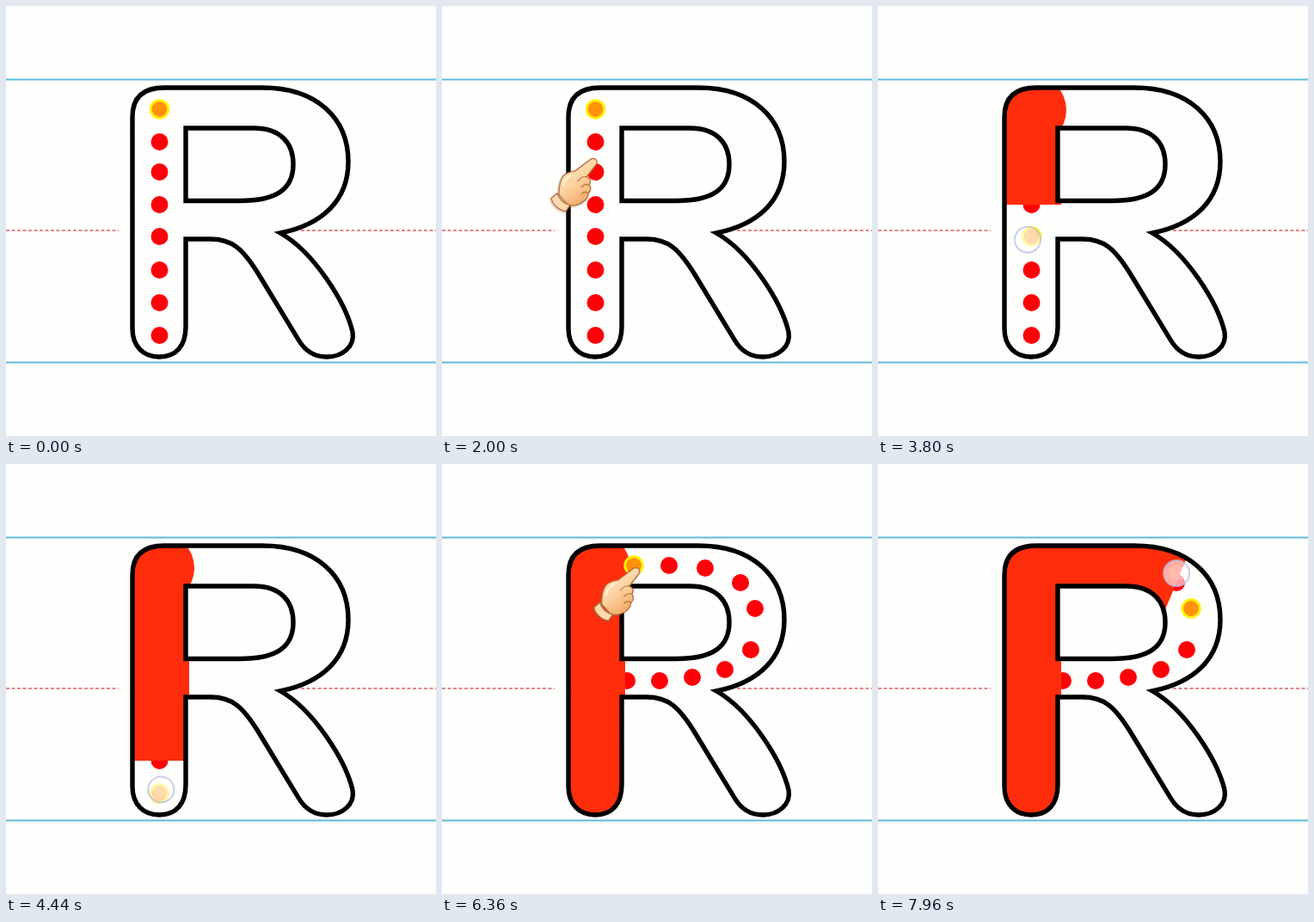
An HTML page that plays this animation: 500x500 px, repeating every 8 s.

```html
<!DOCTYPE html>
<html lang="en">
<head>
<meta charset="utf-8">
<title>Trace the letter</title>
<style>
  html, body { margin: 0; width: 100%; height: 100%; overflow: hidden; background: #fefefd; }
  svg { display: block; width: 100%; height: 100%; }
</style>
</head>
<body>
<svg viewBox="0 0 500 500">
  <defs>
    <path id="letter" d="M147 129C147 106 160 95 184 95H298C362 95 398 131 398 181C398 226 368 254 319 264C358 286 395 345 403 379C406 396 391 408 373 408C358 408 347 400 340 388L295 314C275 281 262 271 238 271H209V373C209 395 198 408 178 408C160 408 147 396 147 375Z
      M209 142H288C320 142 334 160 334 184C334 212 316 226.500 272 226.500H209Z"/>
    <clipPath id="inside"><use href="#letter" clip-rule="evenodd"/></clipPath>
    <linearGradient id="skin" x1="0" y1="0" x2=".6" y2="1">
      <stop offset="0" stop-color="#ffeacb"/>
      <stop offset=".55" stop-color="#fdd3a2"/>
      <stop offset="1" stop-color="#f2a664"/>
    </linearGradient>
    <path id="palm" d="M171 136C176 131 183 135 179 141L168 155C173 157 174 161 171 164C174 167 173 172 170 174C170 181 163 186 156 188C151 189 147 188 145 186L136 176C136 168 137 159 141 154C144 150 150 149 155 148Z"/>
    <path id="cuff" d="M134 174C136 181 141 186 149 188L144 195C136 194 129 188 127 180Z"/>
  </defs>
  <rect width="500" height="500" fill="#fefefd"/>
  <path d="M0 85.500H500M0 414.500H500" stroke="#5fbcd8" stroke-width="1.800"/>
  <path d="M0 261H131M343 261H500" stroke="#d4626a" stroke-width="1.500" stroke-dasharray="4 2.500"/>
  <g id="dots" fill="#ff0008"></g>
  <g clip-path="url(#inside)" fill="none" stroke="#ff2d0c" stroke-width="70" stroke-linejoin="round">
    <circle id="cap" cx="178" cy="121" r="41" fill="#ff2d0c" stroke="none"/>
    <path id="stem"/>
    <path id="bowl"/>
  </g>
  <use href="#letter" fill="none" stroke="#000" stroke-width="5.400" stroke-miterlimit="10"/>
  <circle id="next" r="10.300" fill="#ff9208" stroke="#fff200" stroke-width="2.800"/>
  <g id="hand" stroke-linejoin="round" stroke-linecap="round">
    <g fill="#8a5a3a" stroke="#8a5a3a" stroke-width="3" opacity=".22" transform="translate(-1 1)">
      <use href="#palm"/><use href="#cuff"/>
    </g>
    <g fill="url(#skin)" stroke="#b4703c" stroke-width="1.300">
      <use href="#palm"/><use href="#cuff" fill="#ffd9ae"/>
    </g>
    <g fill="none" stroke="#b4703c" stroke-width="1.200">
      <path d="M168 155C164 154 160 157 158 160M171 164C167 163 164 165 162 167M170 174C167 172 164 173 162 175"/>
      <path d="M141 165C142 160 146 155 150 153" stroke="#fff3df" stroke-width="2"/>
    </g>
  </g>
  <g id="touch">
    <circle r="15" fill="#fff" fill-opacity=".62" stroke="#b9bde0" stroke-opacity=".75" stroke-width="2"/>
    <circle r="9" fill="#fff" fill-opacity=".15"/>
  </g>
</svg>
<script>
const LOOP = 8000;
const SWITCH = 4480;
const $ = id => document.getElementById(id);
const clamp = v => Math.max(0, Math.min(1, v));
const ramp = (t, a, b) => clamp((t - a) / (b - a));

const stemDots = [120, 158, 193, 231, 268, 307, 345, 383].map(y => [178.5, y]);
const bowlDots = [[223, 118], [264, 118], [306, 121], [347, 138], [364, 168],
  [359, 216], [329, 239], [291, 248], [253, 252], [215, 252]];

// Touch keyframes: time, x, y
const stemTouch = [[2900, 178, 120], [3800, 174, 271.5], [4720, 183, 425]];
const bowlTouch = [[7040, 213, 106], [7390, 264, 108], [7680, 306, 113], [7960, 347, 127], [8000, 352, 131]];

// Hint hand: shown from, hidden at, start of the move, fingertip, direction
const hints = [
  { on: 160, off: 2890, go: 870, x: 178, y: 121, dx: 0, dy: 1 },
  { on: 4880, off: 7090, go: 6250, x: 222, y: 122, dx: 1, dy: 0 }
];
const HAND_SPEED = 0.051;

function along(keys, t) {
  let i = 1;
  while (i < keys.length - 1 && t > keys[i][0]) i++;
  const [a, b] = [keys[i - 1], keys[i]];
  const k = ramp(t, a[0], b[0]);
  return [a[1] + (b[1] - a[1]) * k, a[2] + (b[2] - a[2]) * k];
}

const line = pts => pts.length > 1 ? "M" + pts.map(p => p.join(" ")).join("L") : "";

function place(el, [x, y], opacity) {
  el.setAttribute("transform", `translate(${x} ${y})`);
  el.setAttribute("opacity", opacity);
}

function dotGroup(dots) {
  const g = document.createElementNS("http://www.w3.org/2000/svg", "g");
  g.innerHTML = dots.map(([x, y]) => `<circle cx="${x}" cy="${y}" r="10"/>`).join("");
  $("dots").append(g);
  return g;
}
const groups = [dotGroup(stemDots), dotGroup(bowlDots)];

function render(t) {
  const second = t >= SWITCH;
  const dots = second ? bowlDots : stemDots;
  const touch = along(second && t > 6000 ? bowlTouch : stemTouch, t);

  // Each dot the finger passes extends the colour to that dot.
  let hit = 0;
  if (second) {
    if (t > 7100) hit = bowlDots.filter(p => p[0] <= touch[0] + 5 && p[1] < 150).length;
  } else if (t >= 2920) {
    hit = stemDots.filter(p => p[1] <= touch[1] - 5).length;
  }
  groups[0].style.display = second ? "none" : "";
  groups[1].style.display = second ? "" : "none";

  const stem = second ? [[178, 100], [178, 425]]
    : hit ? [[178, 100], [178, stemDots[hit - 1][1]]] : [];
  $("stem").setAttribute("d", line(stem));
  $("cap").style.display = hit > 1 || second ? "" : "none";
  $("bowl").setAttribute("d", second && hit ? line([[180, 118], ...bowlDots.slice(0, hit)]) : "");

  const active = dots[Math.min(hit, dots.length - 1)];
  place($("next"), active, 1);

  const h = hints[second ? 1 : 0];
  const d = Math.max(0, t - h.go) * HAND_SPEED;
  place($("hand"), [h.x + h.dx * d - 178, h.y + h.dy * d - 135],
    t < h.off ? ramp(t, h.on, h.on + 150) : 0);

  const shown = t < 6000
    ? ramp(t, 2860, 2960) * (1 - ramp(t, 4740, 5150))
    : ramp(t, 6960, 7060);
  place($("touch"), touch, shown);
}

const start = performance.now();
function tick() {
  render((performance.now() - start) % LOOP);
  requestAnimationFrame(tick);
}
render(0);
requestAnimationFrame(tick);
</script>
</body>
</html>
```
